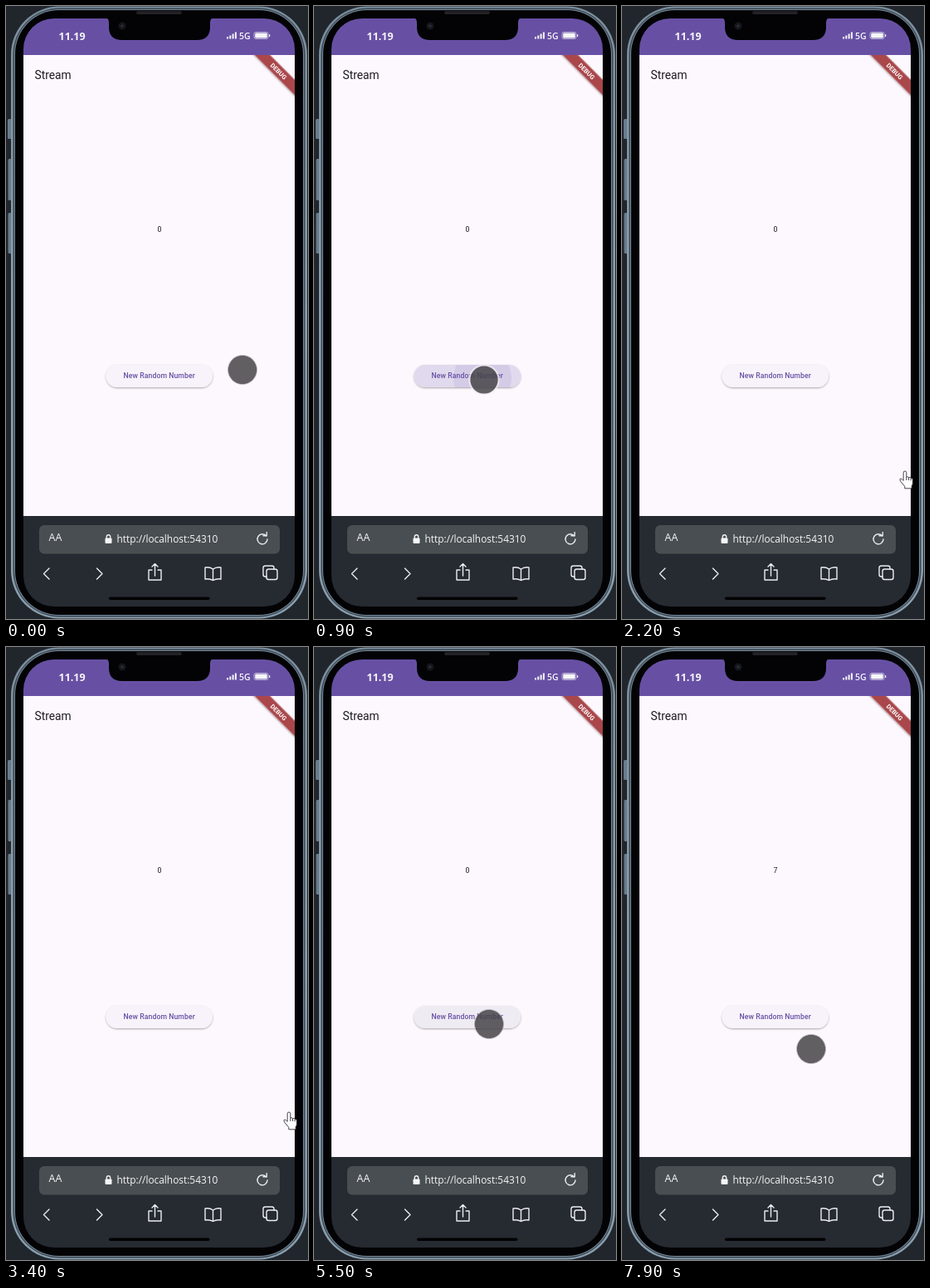
Write an HTML page that moves like this. It is 364 px wide and 738 px high and loops after 8000 ms.

```html
<!DOCTYPE html>
<html lang="en">
<head>
<meta charset="utf-8">
<title>Stream</title>
<style>
  html, body { margin: 0; width: 100%; height: 100%; overflow: hidden; background: #21262d; }
  svg { display: block; width: 364px; height: 738px; }
  .app { font-family: Roboto, sans-serif; }
  .sys { font-family: "Open Sans", sans-serif; fill: #f6f6f8; }
  .icon { fill: none; stroke: #eceef0; stroke-width: 1.4; stroke-linecap: round; stroke-linejoin: round; }
</style>
</head>
<body>
<svg viewBox="0 0 364 738">
  <defs>
    <linearGradient id="metal" x2="0" y2="1">
      <stop offset="0" stop-color="#7b8e9c"/>
      <stop offset=".5" stop-color="#8ca1b0"/>
      <stop offset="1" stop-color="#899ead"/>
    </linearGradient>
    <clipPath id="screen"><rect x="21" y="15" width="327" height="708" rx="37"/></clipPath>
    <clipPath id="page"><rect x="21" y="59" width="327" height="555"/></clipPath>
    <clipPath id="pill"><rect x="120.5" y="432" width="128.5" height="27.5" rx="13.75"/></clipPath>
    <filter id="shade" x="-20%" y="-40%" width="140%" height="200%">
      <feDropShadow dx="0" dy="1" stdDeviation=".9" flood-color="#000" flood-opacity=".34"/>
    </filter>
  </defs>

  <!-- phone body -->
  <g fill="#697d8c">
    <rect x="2" y="136" width="5" height="24" rx="1.5"/>
    <rect x="2.5" y="184" width="4.5" height="50" rx="1.5"/>
    <rect x="2.5" y="249" width="4.5" height="49" rx="1.5"/>
  </g>
  <rect x="6" y=".5" width="357" height="737" rx="58" fill="url(#metal)"/>
  <rect x="8.5" y="2.5" width="352" height="733" rx="56" fill="#3a4650"/>
  <rect x="10" y="4" width="349" height="730" rx="54" fill="#75889a"/>
  <rect x="11" y="5" width="347" height="728" rx="53" fill="#030305"/>
  <rect x="157" y="6" width="55" height="4" rx="2" fill="#222226"/>

  <!-- screen -->
  <g clip-path="url(#screen)">
    <rect x="21" y="15" width="327" height="44" fill="#6750a4"/>
    <rect x="21" y="59" width="327" height="555" fill="#fdf8fe"/>
    <rect x="21" y="614" width="327" height="110" fill="#262a31"/>
  </g>
  <path d="M120 14Q124 15 124 20V25Q124 41 140 41H230Q246 41 246 25V20Q246 15 250 14Z" fill="#030305"/>
  <circle cx="140" cy="24" r="4.5" fill="#15161c"/>
  <circle cx="140" cy="24" r="1.8" fill="#2b2d38"/>

  <!-- status bar -->
  <g class="sys">
    <text x="63.5" y="41" font-size="12.5" font-weight="700">11.19</text>
    <text x="281" y="39.5" font-size="10.5" font-weight="600">5G</text>
    <path d="M266 37h2v2.500h-2zM269.300 35.500h2v4h-2zM272.600 33.500h2v6h-2zM275.900 31.500h2v8h-2z"/>
    <rect x="299" y="31.500" width="17" height="8" rx="2" fill="none" stroke="#cfc5e4" stroke-width=".8"/>
    <rect x="300.200" y="32.500" width="14.600" height="6" rx="1.200"/>
    <rect x="317" y="34" width="1.200" height="3" rx=".6"/>
  </g>

  <!-- app -->
  <g class="app">
    <text x="34.500" y="88" font-size="13.800" fill="#1d1b20">Stream</text>
    <g clip-path="url(#page)">
      <g transform="translate(328.500 78.500) rotate(45)">
        <rect x="-50" y="-6.500" width="100" height="13" fill="#a9474b" filter="url(#shade)"/>
        <text y="2.800" font-size="7.600" font-weight="700" fill="#fff" text-anchor="middle">DEBUG</text>
      </g>
    </g>
    <text id="number" x="185" y="272" font-size="8.700" fill="#1d1b20" text-anchor="middle">0</text>
    <rect id="button" x="120.500" y="432" width="128.500" height="27" rx="13.500" filter="url(#shade)"/>
    <g clip-path="url(#pill)"><circle id="ripple" cx="203" cy="448" fill="#6750a4"/></g>
    <text x="184.700" y="448.300" font-size="8.700" font-weight="500" letter-spacing=".06" fill="#6750a4" text-anchor="middle">New Random Number</text>
  </g>

  <!-- browser bar -->
  <rect x="40" y="625" width="290" height="34.500" rx="6" fill="#494e52"/>
  <g class="sys">
    <text x="51.500" y="644" font-size="12.500">AA</text>
    <text x="133.500" y="646" font-size="11.900">http://localhost:54310</text>
    <rect x="119.500" y="640.500" width="8" height="6.500" rx="1"/>
  </g>
  <g class="icon">
    <path d="M121.300 640.500v-1.500a2.200 2.200 0 0 1 4.400 0v1.500"/>
    <path d="M313.800 638.200A6 6 0 1 0 315 642M310 637.800h4.200v-4.200"/>
    <path d="M52 677l-6.500 6.500 6.500 6.500M109.500 677l6.500 6.500-6.500 6.500"/>
    <path d="M176 679h-4v12h15v-12h-4M179.500 686v-14M176 675l3.500-3.500 3.500 3.500"/>
    <path d="M249.500 678q-4-3-9.500-2v14q5.500-1 9.500 1.500q4-2.500 9.500-1.500v-14q-5.500-1-9.500 2v13"/>
    <rect x="314" y="678" width="13" height="12.500" rx="2.500"/>
    <path d="M314 687h-1.500q-2.500 0-2.500-2.500v-8q0-2.500 2.500-2.500h8q2.500 0 2.500 2.500v1.500"/>
  </g>
  <rect x="124" y="711.500" width="121.500" height="3.500" rx="1.750" fill="#020203"/>

  <!-- pointers -->
  <g id="touch">
    <circle r="17.300" fill="#454246" fill-opacity=".84"/>
    <circle id="ring" r="17.600" fill="none"/>
  </g>
  <path id="hand" d="M341 560q1.800 0 1.800 1.800v5.200q2-.8 2.700.5q2-.6 2.600.8q2.300-.3 2.300 2v4q0 2-1.200 3.500v3h-8.400v-2.500l-5-6q-1.800-2.500-.2-3.200q1.500-.5 3.600 2.300v-9.600q0-1.800 1.800-1.800zM342.800 567v4M345.500 567.500v3.500M348.100 568.300v3"
    fill="#fff" stroke="#333036" stroke-width=".9" stroke-linejoin="round"/>
</svg>

<script>
const LOOP = 8000, STEP = 100;
const el = id => document.getElementById(id);
const set = (node, attrs) => { for (const k in attrs) node.setAttribute(k, attrs[k]); };

// time, x, y
const path = [
  [0, 285, 438], [100, 276, 439], [200, 254, 443], [300, 229, 447], [400, 211, 449], [500, 205, 450],
  [1700, 245, 482], [1800, 290, 516], [1900, 317, 541], [2000, 334, 560], [2100, 340, 570],
  [3500, 341, 567], [3600, 321, 550], [3700, 289, 526], [3800, 256, 502], [3900, 230, 481],
  [4000, 217, 467], [4100, 211, 460], [4200, 218, 460], [4300, 213, 460],
  [5500, 211, 454], [7800, 220, 470], [7900, 228, 484]
];

const IDLE = "#f8f3fa", HOVER = "#efebf3", PRESS = "#e1d9ed";
// time, fill, ripple radius, ripple opacity
const button = [
  [0, IDLE, 0, 0], [300, HOVER, 0, 0],
  [900, PRESS, 35, .1], [1000, PRESS, 60, .1], [1100, PRESS, 90, .1],
  [1300, "#e7e1ef", 90, .04], [1400, HOVER, 0, 0], [1700, IDLE, 0, 0],
  [5500, HOVER, 0, 0], [5600, PRESS, 35, .1],
  [5900, PRESS, 60, .1], [6000, PRESS, 90, .1], [6300, "#e7e1ef", 90, .04], [6500, HOVER, 0, 0],
  [7800, IDLE, 0, 0]
];

const at = (table, t) => table.findLast(row => row[0] <= t);

function draw(time) {
  const t = Math.floor(time % LOOP / STEP) * STEP;
  const [, x, y] = at(path, t);
  const [, fill, r, alpha] = at(button, t);
  const hand = t >= 2200 && t < 3500;
  const pressed = alpha >= .1;

  set(el("button"), { fill });
  set(el("ripple"), { r, opacity: alpha });
  set(el("touch"), { transform: `translate(${x} ${y})`, visibility: hand ? "hidden" : "visible" });
  set(el("ring"), {
    stroke: pressed ? "#f4f0f8" : "#aaa6ac",
    "stroke-width": pressed ? 2 : .9,
    "stroke-opacity": pressed ? .8 : .7
  });
  set(el("hand"), { visibility: hand ? "visible" : "hidden" });
  el("number").textContent = t >= 6000 ? "7" : "0";
}

const start = performance.now();
function tick() {
  draw(performance.now() - start);
  requestAnimationFrame(tick);
}
tick();
</script>
</body>
</html>
```
